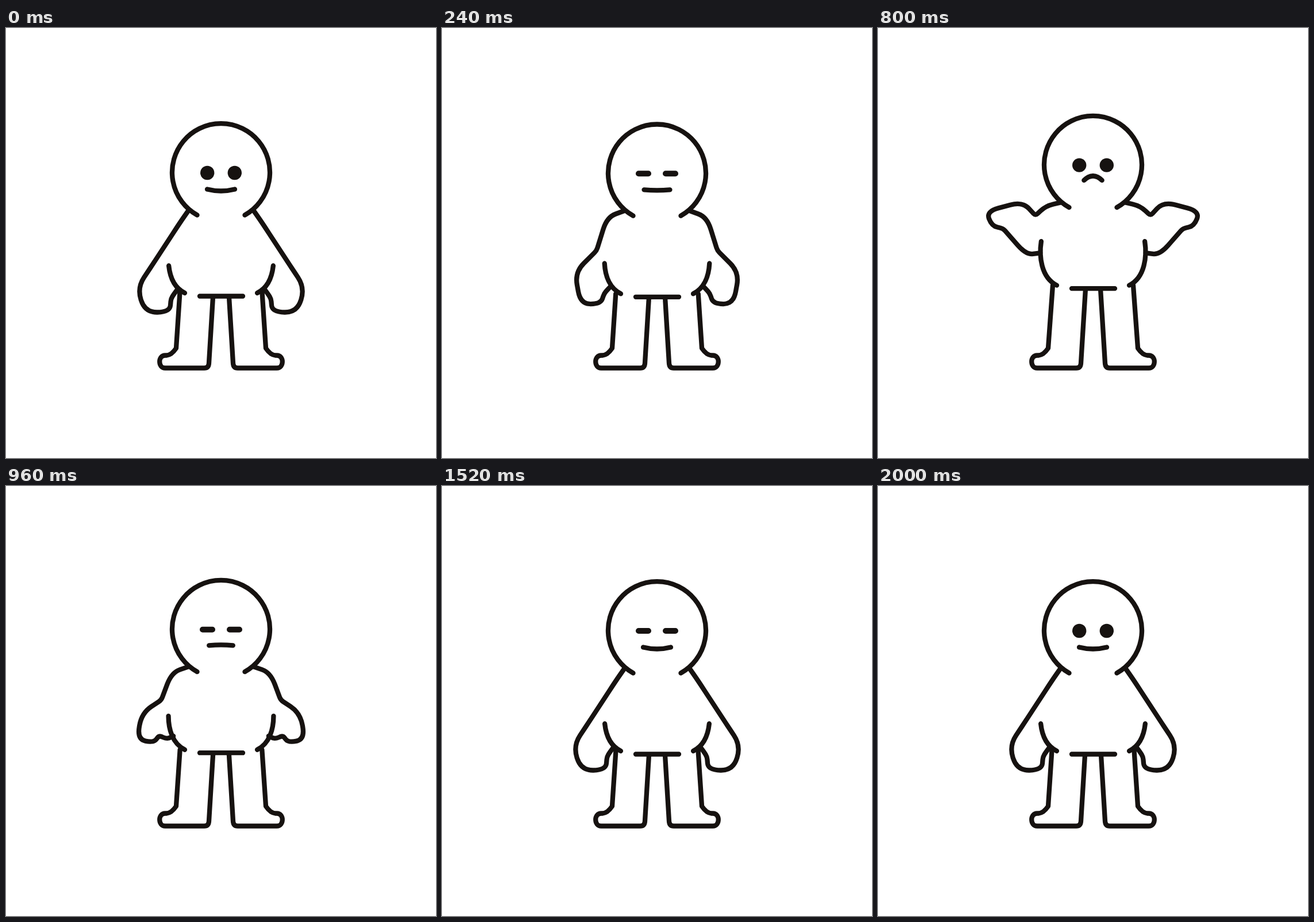
Animation of 748x748 px, one loop 2.08 s. Source, as an HTML page:

```html
<!DOCTYPE html>
<html lang="en">
<head>
<meta charset="utf-8">
<title>Shrug</title>
<style>
  html, body { margin: 0; width: 100%; height: 100%; overflow: hidden; background: #fff; }
  svg { display: block; width: 100%; height: 100%; }
  .line { fill: none; stroke: #161210; stroke-width: 8.3; stroke-linecap: round; stroke-linejoin: round; }
</style>
</head>
<body>
<svg viewBox="0 0 748 748" class="line">
  <g id="half">
    <path id="leg"/>
    <path id="arm"/>
    <path id="belly" class="torso" pathLength="100" d="M311 461 C283 447 280 409 284 384"/>
  </g>
  <use href="#half" transform="matrix(-1 0 0 1 748 0)"/>
  <g class="torso">
    <path d="M332.5 325.4 A85 85 0 1 1 415.5 325.4 M337 466.5 H412"/>
    <path id="mouth"/>
    <g id="open" fill="#161210" stroke="none">
      <circle cx="350.2" cy="252" r="12.2"/>
      <circle cx="397.8" cy="252" r="12.2"/>
    </g>
    <path id="shut" stroke-width="10" d="M342 252 H359 M389 252 H406"/>
  </g>
</svg>
<script>
const LOOP = 2080, STEP = 80, MOVE = 400, FALL = 720, DIP = 240, BLINK = 160;
const blinks = [240, 960, 1520, 1840];
const $ = id => document.getElementById(id);
const mix = (a, b, k) => a + (b - a) * k;
const mixPoint = (a, b, k) => a.map((v, i) => mix(v, b[i], k));

// Arm corners run from the shoulder around the hand to the armpit.
const corners = text => text.split('  ').map(pair => pair.split(' ').map(Number));
const poses = [
  { lift: 0, mood: 0,
    arm: corners('317 318  303 338  254 413  228 452  242 495  285 494  287 471  292 463  298 455') },
  { lift: 1.3, mood: .18,
    arm: corners('317 318  287 329  269 387  231 425  241 480  276 480  282 462  288 455  294 449') },
  { lift: -13.7, mood: 1,
    arm: corners('318 303  292 309  274 325  252 299  187 315  196 341  216 346  257 393  282 390') }
];
const creases = [2, 6];

// Polyline with each corner cut back and bent over.
function rounded(points) {
  const cut = (from, to, r) =>
    mixPoint(from, to, Math.min(.5, r / Math.hypot(to[0] - from[0], to[1] - from[1])));
  const bends = points.slice(1, -1).map((p, i) => {
    const r = creases.includes(i + 1) ? 5 : 22;
    return `L${cut(p, points[i], r)} Q${p} ${cut(p, points[i + 2], r)}`;
  });
  return `M${points[0]} ${bends.join(' ')} L${points.at(-1)}`;
}

// Smooth 0 to 1 over one move; a higher delay starts slower.
function ease(t, delay) {
  const u = Math.min(1, Math.max(0, t / MOVE)) ** delay;
  return u * u * (3 - 2 * u);
}

const during = (t, from, length) => t >= from && t < from + length;
const dipFrom = (t, from) => during(t, from, DIP) ? 2.9 * Math.sin(Math.PI * (t - from) / DIP) : 0;

function draw(time) {
  const t = Math.floor(time / STEP) * STEP;
  const pose = 2 * (ease(t, 1.36) - ease(t - FALL, 1.7));
  const dip = dipFrom(t, 0) + dipFrom(t, FALL + DIP);

  const i = pose < 1 ? 0 : 1, k = pose - i;
  const a = poses[i], b = poses[i + 1];
  const mood = mix(a.mood, b.mood, k);
  const dy = mix(a.lift, b.lift, k) + dip;

  // The dip lowers the arms and tucks the hands inwards.
  const arm = a.arm.map((p, n) => {
    const [x, y] = mixPoint(p, b.arm[n], k);
    const tuck = dip * Math.min(1, n / 3);
    return [x + 1.4 * tuck, y + dip + .8 * tuck];
  });
  $('arm').setAttribute('d', rounded(arm));
  $('leg').setAttribute('d',
    `M${302.4 - .12 * dy} ${461 + dy} L296 557 Q288 569 279 569.5 H277 C264 569.5 264 591.5 277 591.5
     H345 Q352.5 591.5 353 583 L${360 - .07 * dy} ${468 + dy}`);
  $('belly').setAttribute('stroke-dasharray', `${mix(66, 100, mood)} 200`);

  const w = mix(24, 15.5, mood);
  $('mouth').setAttribute('d',
    `M${374 - w} ${mix(280.5, 278.2, mood)} q${w} ${mix(6, -15.5, mood)} ${2 * w} 0`);
  for (const part of document.querySelectorAll('.torso'))
    part.setAttribute('transform', `translate(0 ${dy})`);

  const closed = blinks.some(from => during(t, from, BLINK));
  $('open').setAttribute('visibility', closed ? 'hidden' : 'visible');
  $('shut').setAttribute('visibility', closed ? 'visible' : 'hidden');
}

const start = performance.now();
function tick() {
  draw((performance.now() - start) % LOOP);
  requestAnimationFrame(tick);
}
tick();
</script>
</body>
</html>
```
